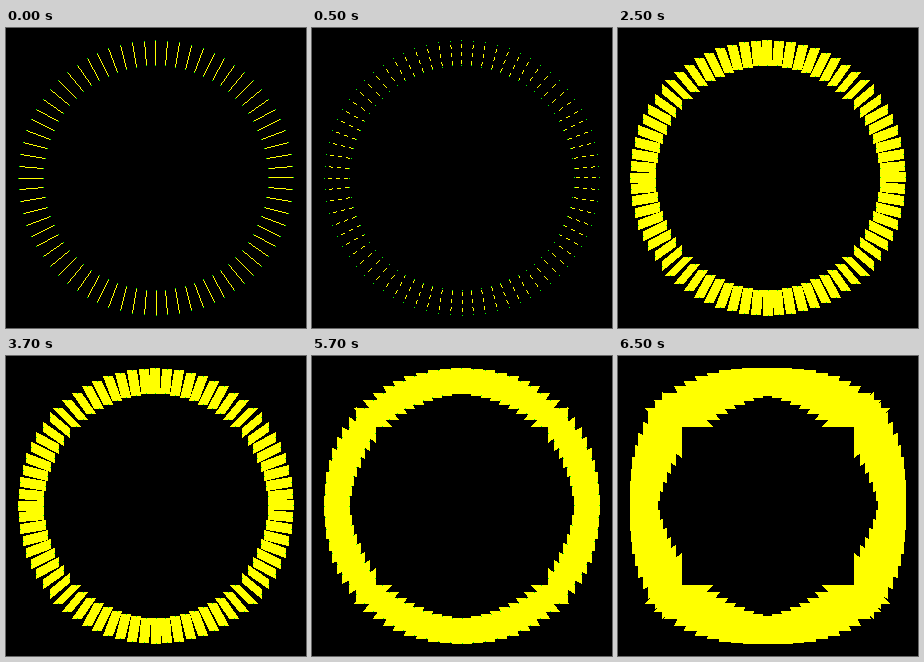
Animation, 300 px wide and 300 px high, one loop 8 s. Source, as an HTML page with a canvas:

```html
<!DOCTYPE html>
<html lang="en">
<head>
<meta charset="utf-8">
<title>Radial line widths</title>
<style>
html, body { margin: 0; width: 100%; height: 100%; overflow: hidden; background: #000; }
canvas { display: block; width: 300px; height: 300px; image-rendering: pixelated; }
</style>
</head>
<body>
<canvas id="stage" width="300" height="300"></canvas>
<script>
const ctx = document.getElementById('stage').getContext('2d');
const LOOP = 8000, CENTER = 150, INNER = 112.5, OUTER = 137.5, COUNT = 72;
const YELLOW = '#ff0', GREEN = '#0f0';

const steps = [
  { at: 0, width: 1, ends: true },
  { at: 500, width: 1, ends: true, dash: 4 },
  { at: 2500, width: 10, ends: true },
  { at: 4500, width: 20, ends: true },
  { at: 6500, width: 50 }
];

function polar(r, a) {
  return [Math.trunc(CENTER + r * Math.cos(a)), Math.trunc(CENTER + r * Math.sin(a))];
}

// Thickness extends straight across the minor axis, so the ends stay square to the grid.
function line([x1, y1], [x2, y2], width, dash) {
  const dx = x2 - x1, dy = y2 - y1;
  const steep = Math.abs(dy) >= Math.abs(dx);
  const n = Math.max(Math.abs(dx), Math.abs(dy));
  const half = width >> 1;
  ctx.fillStyle = YELLOW;
  for (let i = 0; i <= n; i++) {
    if (dash && Math.floor(i / dash) % 2 === 0) continue;
    const x = Math.round(x1 + dx * i / n);
    const y = Math.round(y1 + dy * i / n);
    if (steep) ctx.fillRect(x - half, y, width, 1);
    else ctx.fillRect(x, y - half, 1, width);
  }
}

function dot([x, y]) {
  ctx.fillStyle = GREEN;
  ctx.fillRect(x, y, 1, 1);
}

function draw({ width, dash, ends }) {
  ctx.fillStyle = '#000';
  ctx.fillRect(0, 0, 300, 300);
  for (let i = 1; i <= COUNT; i++) {
    const a = i * 2 * Math.PI / COUNT;
    const from = polar(OUTER, a), to = polar(INNER, a);
    line(from, to, width, dash);
    if (ends) [from, to].forEach(dot);
  }
}

let shown = null;
const start = performance.now();

function tick() {
  const t = (performance.now() - start) % LOOP;
  const step = steps.filter(s => s.at <= t).pop() || steps[0];
  if (step !== shown) draw(shown = step);
  requestAnimationFrame(tick);
}
tick();
</script>
</body>
</html>
```
